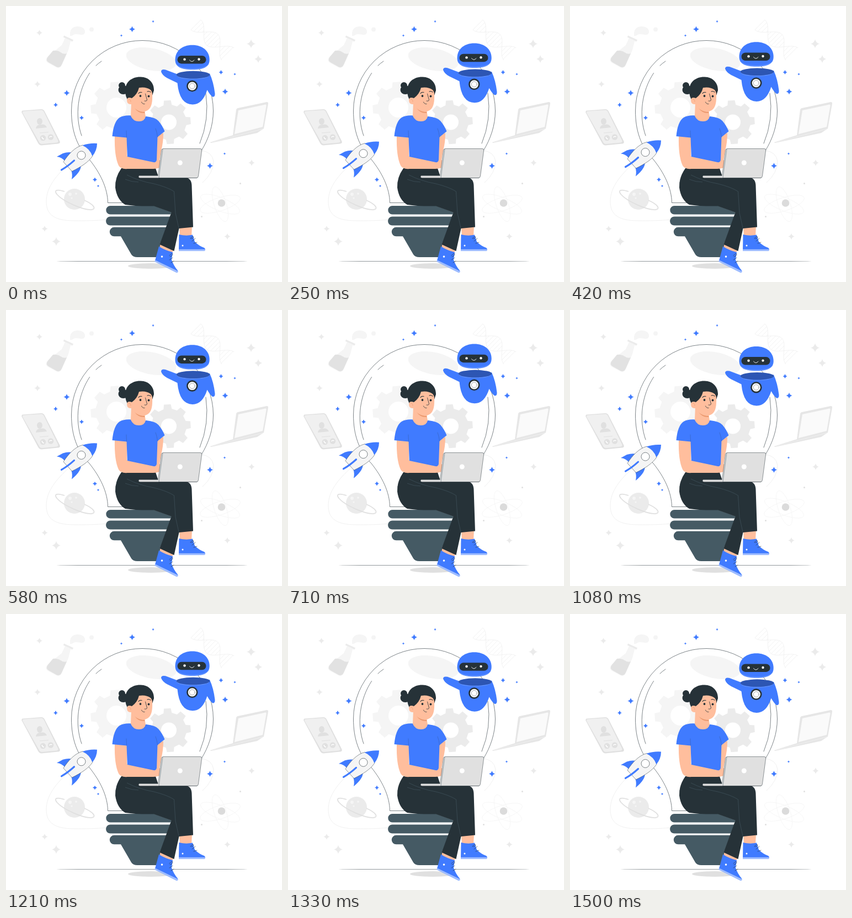
Recreate the animation shown at these times as an HTML page. Size 500 by 500 pixels, loop 1.54 s.

```html
<!DOCTYPE html>
<html lang="en">
<head>
<meta charset="utf-8">
<title>Ideas taking off</title>
<style>
  html, body { margin: 0; width: 100%; height: 100%; overflow: hidden; background: #fff; }
  svg { display: block; width: 100vw; height: 100vh; }
  .line { fill: none; stroke: #263238; stroke-linecap: round; stroke-linejoin: round; }
  .rim { fill: none; stroke: #8cb0ff; }
  .pale { fill: none; stroke: #efefef; }
  .blue { fill: #407bff; }
  .dark { fill: #263238; }
  .skin { fill: #ffbe9d; }
  .slate { fill: #455a64; }
  .sole { fill: #9fbdff; }
  .g0 { fill: #fafafa; }
  .g1 { fill: #f5f5f5; }
  .g2 { fill: #ebebeb; }
  .g3 { fill: #e0e0e0; }
  .white { fill: #fff; }
</style>
</head>
<body>
<svg viewBox="0 0 500 500" xmlns="http://www.w3.org/2000/svg" stroke-width=".6">
  <path class="pale" stroke-width=".9" d="M113 287C92 306 73 328 73 354C73 380 90 388.500 122 389C155 389.500 178 388 200 385M354 262Q373 264 376 281Q376 302 356 320"/>

  <!-- flask and vapour -->
  <path class="g1" d="M105 54L122 61L120 65L117 64L113 80L101 107Q98 114 91 111L76 103Q70 99 75 92L101 71L107 58L104 57Z"/>
  <path d="M85 81Q94 80 99 84Q104 88 110 86L101 106Q98 113 91 110L77 102Q71 98 76 92Z" fill="#e2e2e2"/>
  <path class="g2" d="M105 53.500L122 61.500L120.500 64L104 56.500Z"/>
  <path class="g1" d="M116 54C115 42 121 37 130 37C139 37 144 42 143 48C141 55 133 51 127 51C121 51 121 55 116 54Z"/>
  <circle class="g1" cx="155" cy="42.500" r="4"/>

  <g id="dna" class="pale" stroke-width=".8"></g>

  <!-- phone -->
  <path class="g3" d="M30 189.500L64 187Q68 187 70 191L97.500 245Q99 249 94 249.500L64 252.500Q60 252 58 248L28.500 193Q28 190 30 189.500Z"/>
  <path d="M32 190.500L64 188.500Q67 188.500 68.500 191.500L94.500 244Q95 247 92 247.500L65 250Q62 250 60 246.500L30 193.500Q30 191 32 190.500Z" fill="#f0f0f0"/>
  <g class="g3">
    <ellipse cx="61" cy="209" rx="5" ry="6"/>
    <path d="M54 222Q55 215 62 215Q71 213 74 220Z"/>
    <circle cx="67" cy="239" r="5.200"/><circle cx="81" cy="237.500" r="5.200"/>
    <path d="M61 229.500L77 228V229L61 230.500Z"/>
  </g>
  <path d="M65 237Q66 241 69 241M78.500 238Q81 235 83.500 237" fill="none" stroke="#fff" stroke-width="1.500"/>

  <!-- open notebook -->
  <path d="M420 185L472 174Q475.500 173.500 475 177L467 222L455 230L372 248Q369 248 371 246.500L411 234L417 188Q417.500 185.500 420 185Z" fill="#e6e6e6"/>
  <path class="g0" d="M421 189L470 178.500Q472 178.500 471.500 181L465 219L414 232Z"/>
  <path d="M372 247L466 222.500" stroke="#f5f5f5"/>

  <!-- planet -->
  <circle class="g2" cx="124" cy="350" r="19"/>
  <path d="M106 336C91 331 86 334 93 342C104 354 139 370 155 369C164 368 160 360 142 352" fill="none" stroke="#e0e0e0" stroke-width="1.800"/>
  <circle class="g1" cx="116" cy="341" r="3"/><circle class="g1" cx="127" cy="340" r="1.800"/><circle class="g1" cx="119" cy="348" r="1.500"/>

  <!-- atom -->
  <g fill="none" stroke="#f5f5f5" stroke-width=".8">
    <ellipse cx="388" cy="359" rx="38" ry="12" transform="rotate(-18 388 359)"/>
    <ellipse cx="388" cy="359" rx="38" ry="12" transform="rotate(22 388 359)"/>
    <ellipse cx="388" cy="359" rx="33" ry="11" transform="rotate(72 388 359)"/>
  </g>
  <circle cx="390.500" cy="357" r="6.800" fill="#dbdbdb"/>
  <circle class="g3" cx="424.500" cy="321.500" r="1.500"/><circle class="g3" cx="354.500" cy="381.500" r="1.500"/>

  <!-- bulb -->
  <ellipse class="g1" cx="263" cy="96.500" rx="46" ry="20" transform="rotate(11 263 96.500)"/>
  <g id="gears"></g>
  <path class="line" d="M222 356.500H184.500C184 330 171 303 151 278C128 255 118.500 225 118.500 190A128.500 127.500 0 0 1 375.500 190C375.500 216 367 241 354 262"/>
  <path class="line" d="M151.500 121.500C130 154 124 198 137 235M163 108Q167 104 173 100M362 158Q369 206 351 249"/>

  <ellipse class="g3" cx="262" cy="471" rx="41" ry="5"/>
  <path class="dark" d="M91 462.800Q110 462.300 140 462.400H390Q420 462.300 438 462.800Q420 463.200 390 463.100H140Q110 463.200 91 462.800Z"/>

  <g class="slate">
    <path d="M189 362H268L300 374L298 377.500H189A7.750 7.750 0 0 1 189 362Z"/>
    <path d="M189 381.500H298L293 397.500H189A8 8 0 0 1 189 381.500Z"/>
    <path d="M196 400.800H293L278 455H238Q230 455 227 450L208 417.300H196A8.250 8.250 0 0 1 196 400.800Z"/>
  </g>

  <g id="stars"></g>

  <!-- legs and shoes -->
  <path class="skin" d="M314 400L337 399L336 418L315 419ZM280 428L304 438L300 452L278 441Z"/>
  <path class="blue" d="M313.500 414Q326 417 338 414.500L342 427Q350 435 359 438Q362 440 360 443.500L313 443.500Z"/>
  <path class="sole" d="M313 440.800H360.500Q361.500 442 360 443.500H313Z"/>
  <path class="blue" d="M277 435.500Q289 443 302 446L300 460Q304 471 311 479Q312.500 483 309 483L269.500 463Z"/>
  <path class="sole" d="M270.500 460.500L311 480Q312 483 309 483L269.500 463Z"/>
  <circle class="white" cx="282.500" cy="454" r="1.800"/><circle class="white" cx="320" cy="434" r="1.500"/>
  <path class="line" d="M335 420Q339 415 340 419Q338 422 334 421M337 426L343 421M340 430L346 428M296 452Q302 446 302 450Q301 454 297 454M296 460L302 456M299 465L304 462"/>
  <path class="dark" d="M209 294H271L276 309L325 310.500Q336 312 336.500 325L339 400.500L313.500 403L304.500 444L278.500 432L299.500 374L268 362.500Q235 363 216 360Q201 351 198 329Q197 311 209 294Z"/>
  <path d="M219 306Q240 317 268 322Q292 328 304.500 336L307 375L313 402M216 314Q228 319 240 319" fill="none" stroke="#455a64"/>

  <!-- arms and shirt -->
  <path class="skin" d="M274 234L285 230Q285 248 281 262L276 290L269 287Z"/>
  <path class="skin" d="M197 235L219 237L219 272L268 281L280 279V292Q275 295 266 295H220Q208 296 204 289Q196 272 197 235Z"/>
  <path class="blue" d="M227 198.500Q239 203 254 200Q271 202 276 208Q283 216 287.500 227L274.500 237.500L273 279Q272 284 267 283L219.800 273L218.500 238.500L192.500 236Q195 209 206 202Q214 197.500 227 198.500Z"/>
  <path class="line" d="M274.500 237.500Q274 230 271 222M218.500 238L218 226" stroke-width=".5" opacity=".45"/>

  <!-- head -->
  <path class="skin" d="M227 174L226 199Q230 209 241 209Q251 209 253 200L251 189Z"/>
  <path d="M233 185Q242 193 251 191.500L251.500 194Q240 195 233 185Z" fill="#eb996e"/>
  <circle class="dark" cx="210" cy="144" r="6"/><ellipse class="dark" cx="212.500" cy="152" rx="9" ry="8"/>
  <path class="dark" d="M216 157C214 138 228 128 244 128.500C259 129 268 139 268 153L264 165L228 178Q218 172 216 157Z"/>
  <path class="skin" d="M228 167Q238 160 241 148Q254 146 262 152Q265 155 265 160Q266 180 259 187Q251 194 242 190Q232 187 227 178Q219 179 219 170Q220 164 228 167Z"/>
  <circle class="dark" cx="243.500" cy="163" r="1.900"/><circle class="dark" cx="258.500" cy="163.500" r="1.900"/>
  <path class="line" d="M240 158.500Q242 155.500 246 156.500M256 155Q259 153.500 262 156" stroke-width="1.100"/>
  <path class="line" d="M252.500 159L255.500 170Q255 173 251 172M245.500 174Q247 178 251 177.500" stroke-width=".8"/>
  <path d="M222 169Q226 168 226 174" fill="none" stroke="#eb996e"/>

  <!-- laptop -->
  <path d="M285 258.500H352Q355 258.500 354.700 261.500L348.500 308Q348 311.500 345 311.500H275L281.500 261.500Q282 258.500 285 258.500Z" fill="#e0e0e0" stroke="#263238" stroke-width=".5"/>
  <path d="M284 259L277 311" stroke="#455a64" stroke-width=".5"/>
  <path d="M241 307.500H276V311.500H243Q239 311 241 307.500Z" fill="#dedede"/>
  <path class="line" d="M242 311.500H346" stroke-width=".4"/>
  <circle class="white" cx="315.300" cy="284" r="4.500"/>

  <g class="float">
    <!-- rocket -->
    <path class="blue" d="M92 273.500L103 267.500Q114 264 122 267L107 282Q101 274 92 273.500Z"/>
    <path class="blue" d="M119 295L135 286.500Q139 298 119 314.500Q121 305 118 298Z"/>
    <path d="M104 283C113 269 125 256 139 252.500Q153 257 157 272C150 283 136 292 119.500 300Z" fill="#f5f5f5" stroke="#263238" stroke-width=".5"/>
    <path class="blue" d="M138.500 253Q151 248.500 165 249.500Q165 262 156.500 272.500Q152 259 138.500 253Z"/>
    <circle cx="136.500" cy="271" r="7.500" fill="#fff" stroke="#263238"/>
    <path d="M100.500 297.500Q112 291 123.500 280.500" fill="none" stroke="#407bff" stroke-width="3.200" stroke-linecap="round"/>
  </g>

  <g class="float">
    <!-- robot -->
    <path class="blue" d="M309 123.500L289 116Q281 114.500 281 119.500Q283 126 292 131L310.500 140Q314 178.500 338 179Q356 179 364.500 152.500Q369 161 374 165Q379 166 378.500 159Q376 138 369 123Z"/>
    <path class="rim" d="M309 125Q310 132.500 339 132.500Q368 132.500 369.500 124"/>
    <ellipse cx="339" cy="125.200" rx="30.300" ry="6.800" fill="#2d56b3"/>
    <circle class="dark" cx="337.300" cy="145.600" r="10.200"/>
    <circle class="white" cx="337.300" cy="145.600" r="7.600"/>
    <circle class="line" cx="337.300" cy="145.600" r="5" stroke-width=".4"/>
    <path class="blue" d="M337.500 71.300C356 71.300 368.700 82 368.700 98C368.700 111 358 115.700 338 115.700C317 115.700 306.500 111 306.500 98C306.500 82 319 71.300 337.500 71.300Z"/>
    <path class="rim" d="M308 106Q314 114.500 338 114.500Q361 114.500 367.500 106"/>
    <rect class="dark" x="310.500" y="90.500" width="52" height="14.500" rx="7.200"/>
    <circle class="white" cx="323.500" cy="97.200" r="2.200"/><circle class="white" cx="349.500" cy="97" r="2.200"/>
    <path d="M332.500 98.500Q336.800 104 341 98.500" fill="none" stroke="#fff" stroke-width=".9" stroke-linecap="round"/>
  </g>
</svg>
<script>
const LOOP = 1540, LOW = 1497, RISE = 10;
const el = id => document.getElementById(id);

const star = (x, y, r, cls) =>
  `<path class="${cls}" transform="translate(${x} ${y}) scale(${r})" d="M0-1Q.2-.2 1 0Q.2 .2 0 1Q-.2 .2-1 0Q-.2-.2 0-1Z"/>`;

const grey = [[60.5, 48.5, 5.5], [444, 68.5, 8], [457, 96, 7], [57, 141.5, 5.8], [445, 284, 5.8],
  [70, 403.5, 5.5], [91, 426.5, 7.8], [401, 417.5, 5.8]];
const bright = [[228.5, 42, 5.6], [209, 53.5, 2.2], [266.5, 28, 2.2], [110, 157.5, 5.6], [90, 179, 4],
  [137, 202.5, 4], [389.5, 120, 4], [414.5, 123.5, 2.2], [397, 155, 5.6], [396, 267.5, 2.2],
  [369.5, 289.5, 5.6], [161, 314.5, 4], [167, 326, 2.2]];
el('stars').innerHTML =
  grey.map(s => star(...s, 'g2')).join('') + bright.map(s => star(...s, 'blue')).join('');

function gear(cx, cy, outer, inner, hole, teeth, turn, cls) {
  const step = 2 * Math.PI / teeth, pts = [];
  const add = (r, a) => pts.push((cx + r * Math.cos(a)).toFixed(1) + ' ' + (cy + r * Math.sin(a)).toFixed(1));
  for (let i = 0; i < teeth; i++) {
    const a = turn + i * step;
    add(inner, a - step * .3);
    add(outer, a - step * .2);
    add(outer, a + step * .2);
    add(inner, a + step * .3);
  }
  return `<path class="${cls}" d="M${pts.join('L')}Z"/>` +
    `<circle class="white" cx="${cx}" cy="${cy}" r="${hole}"/>`;
}
el('gears').innerHTML =
  gear(200, 184, 47, 38, 18, 8, -.07, 'g1') + gear(295, 210.5, 40, 32, 14, 8, -.07, 'g2');

// double helix along a slanted axis
function helix() {
  const at = (u, side) => {
    const w = side * (9 + 2 * u) * Math.cos(u * Math.PI * 2);
    return `${(344 + 58 * u + w).toFixed(1)} ${(34 + 53 * u - w).toFixed(1)}`;
  };
  const us = Array.from({ length: 41 }, (_, i) => i / 40);
  const strand = side => 'M' + us.map(u => at(u, side)).join('L');
  const rungs = us.filter((_, i) => i % 3 === 0).map(u => `M${at(u, 1)}L${at(u, -1)}`).join('');
  return `<path d="${strand(1)}${strand(-1)}${rungs}"/>`;
}
el('dna').innerHTML = helix();

const floats = document.querySelectorAll('.float');
function draw(ms) {
  const p = ((ms - LOW + LOOP) % LOOP) / LOOP;
  const y = -RISE * (1 - Math.abs(2 * p - 1));
  floats.forEach(g => g.setAttribute('transform', `translate(0 ${y.toFixed(2)})`));
}

let start = null;
function tick(now) {
  if (start === null) start = now;
  draw((now - start) % LOOP);
  requestAnimationFrame(tick);
}
draw(0);
requestAnimationFrame(tick);
</script>
</body>
</html>
```
